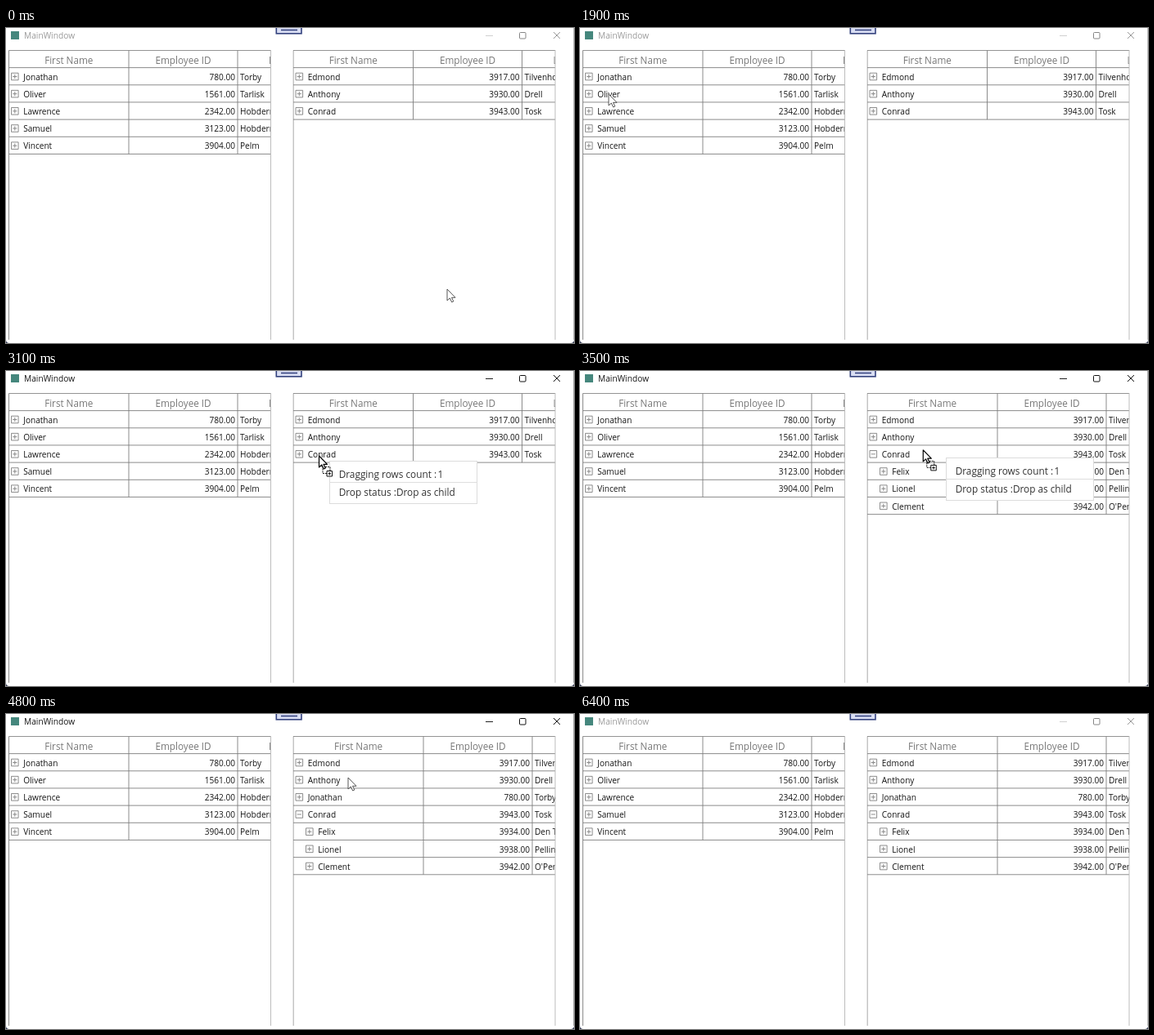
Write an HTML page that moves like this. It is 694 px wide and 386 px high and loops after 7000 ms.

```html
<!DOCTYPE html>
<html lang="en">
<head>
<meta charset="utf-8">
<title>MainWindow</title>
<style>
  html, body { margin: 0; width: 100%; height: 100%; overflow: hidden; background: #2c3450; }
  svg { display: block; width: 694px; height: 386px; font-family: "Open Sans", "Noto Sans", sans-serif; font-size: 10.1px; fill: #161616; }
  .line { stroke: #7d7d7d; stroke-width: .88; fill: none; }
  .pale { stroke: #b4b4b4; stroke-width: .88; fill: none; }
  .head { font-size: 11.7px; fill: #787878; text-anchor: middle; }
  .num { text-anchor: end; }
  .popup { font-size: 11.8px; fill: #333; }
</style>
</head>
<body>
<svg id="stage" viewBox="0 0 694 386">
  <defs>
    <clipPath id="leftClip"><rect x="3" y="27" width="320.500" height="355"/></clipPath>
    <clipPath id="rightClip"><rect x="350.500" y="27" width="320.500" height="355"/></clipPath>
  </defs>
  <rect y="-10" width="694" height="396" rx="4" fill="#fff"/>
  <path id="edge" d="M693.5 0V382"/>
  <rect x="6" y="4" width="10" height="10" fill="#45877d"/>
  <text id="title" x="22" y="13.3" font-size="10.2">MainWindow</text>
  <g fill="none">
    <path id="minimize" d="M586 9.5h9"/>
    <rect id="maximize" x="627.5" y="5.5" width="7.5" height="7.5" rx="1"/>
    <path id="close" d="M669 5l8 8m0-8l-8 8"/>
  </g>
  <rect x="330.3" y="-4" width="30.7" height="10.8" fill="#d9def3" stroke="#34427e" stroke-width="1.6"/>
  <path d="M336 2.5h20" stroke="#34427e" stroke-width="1.6"/>
  <g id="left" clip-path="url(#leftClip)"></g>
  <g id="right" clip-path="url(#rightClip)"></g>
  <path class="pale" d="M323.5 27V382M671 27V382"/>
  <g id="arrows" fill="#fff" stroke="#8a8a8a">
    <path d="M365 72.5h4.5v7.5h3L367.2 87l-5.2-7h3z"/>
    <path d="M365 110h4.5v-7.5h3L367.2 95.5l-5.2 7h3z"/>
  </g>
  <g id="popup" class="popup">
    <rect width="180" height="52" fill="#fff" stroke="#dcdcdc"/>
    <path d="M0 26H180" stroke="#dedede"/>
    <text x="11.2" y="20.3">Dragging rows count :<tspan dx="1.5">1</tspan></text>
    <text x="11.2" y="42.7">Drop status :<tspan id="status"></tspan></text>
  </g>
  <g id="cursor">
    <g id="badge" fill="none" stroke="#111">
      <rect x="4.5" y="13.5" width="9" height="8" stroke-dasharray="2 1"/>
      <path id="plus" fill="#fff" d="M9.5 18.5h6.500v6.500h-6.500zM12.750 20v3.500M11 21.750h3.500"/>
    </g>
    <path id="pointer" fill="#fff" stroke-linejoin="round" d="M0 0V14L3.3 11 5.7 16 7.8 15 5.5 10.3H10Z"/>
  </g>
</svg>
<script>
const LOOP = 7000, STEP = 100;
const ACTIVATE = 2500, EXPAND = 3200, DROP = 4400, DEACTIVATE = 6400;
const HEADER_TOP = 27.43, ROW_HEIGHT = 21.17;
const $ = id => document.getElementById(id);

const person = (first, id, last, depth = 0) => ({ first, id, last, depth });
const dragged = person("Jonathan", 780, "Torby");
const leftRows = [
  dragged,
  person("Oliver", 1561, "Tarlisk"),
  person("Lawrence", 2342, "Hobdern"),
  person("Samuel", 3123, "Hobdern"),
  person("Vincent", 3904, "Pelm")
];
const parent = person("Conrad", 3943, "Tosk");
const roots = [person("Edmond", 3917, "Tilvenhoer"), person("Anthony", 3930, "Drell")];
const children = [
  person("Felix", 3934, "Den Torel", 1),
  person("Lionel", 3938, "Pellinger", 1),
  person("Clement", 3942, "O'Pendry", 1)
];

// Time, x and y of the pointer tip
const path = [
  [0, 539, 320], [100, 30, 58], [200, 539, 320], [1100, 539, 320],
  [1900, 35, 81], [2000, 33, 73], [2300, 49, 56], [2400, 49, 56],
  [2600, 97, 75], [2700, 127, 82], [2900, 320, 98], [3000, 381, 104],
  [3200, 384, 104], [3400, 433, 100], [3700, 380, 88], [4300, 380, 88],
  [4800, 418, 78], [5100, 130, 57], [5200, 60, 51], [5300, 35, 60],
  [5500, 90, 135], [5700, 240, 235], [5900, 402, 259], [6100, 654, 174], [LOOP, 654, 174]
];

function pointerAt(time) {
  const i = path.findIndex(key => key[0] > time);
  const [t0, x0, y0] = path[i - 1], [t1, x1, y1] = path[i];
  let p = (time - t0) / (t1 - t0);
  p = p * p * (3 - 2 * p);
  return [x0 + (x1 - x0) * p, y0 + (y1 - y0) * p];
}

const line = d => `<path class="line" d="${d}"/>`;
const text = (x, y, value, kind = "") => `<text class="${kind}" x="${x}" y="${y}">${value}</text>`;
const rowTop = i => HEADER_TOP + ROW_HEIGHT * (i + 1);

function gridMarkup(x, firstWidth, rows, openRow) {
  const idCol = x + firstWidth, lastCol = idCol + 133, bottom = rowTop(rows.length);
  let out = line(`M${x} 382V${HEADER_TOP}h330M${x} ${rowTop(0)}h330M${idCol} ${HEADER_TOP}V${bottom}M${lastCol} ${HEADER_TOP}V${bottom}`);
  out += text((x + idCol) / 2, 43.5, "First Name", "head")
    + text(idCol + 66.5, 43.5, "Employee ID", "head")
    + text(lastCol + 67, 43.5, "Last Name", "head");
  rows.forEach((row, i) => {
    const top = rowTop(i), base = top + 15.2, indent = x + row.depth * 12.5;
    const upright = row === openRow ? "" : "m-2.6-2.6v5.2";
    out += line(`M${x} ${rowTop(i + 1)}h330M${indent + 3} ${top + 6.6}h8.6v8.6h-8.6z`)
      + line(`M${indent + 4.7} ${top + 10.9}h5.2${upright}`)
      + text(indent + 17.7, base, row.first)
      + text(lastCol - 3, base, row.id.toFixed(2), "num")
      + text(lastCol + 3, base, row.last);
  });
  return out;
}

const rightStates = [
  gridMarkup(351, 146.5, [...roots, parent]),
  gridMarkup(351, 159, [...roots, parent, ...children], parent),
  gridMarkup(351, 159, [...roots, dragged, parent, ...children], parent)
];
$("left").innerHTML = gridMarkup(3.5, 146.5, leftRows);

const show = (id, visible) => $(id).setAttribute("visibility", visible ? "visible" : "hidden");
const place = (id, x, y) => $(id).setAttribute("transform", `translate(${x} ${y})`);
const stroke = (id, color) => $(id).setAttribute("stroke", color);
let shownState = -1;

function render(time) {
  const t = Math.floor(time / STEP) * STEP;
  const active = t >= ACTIVATE && t < DEACTIVATE;
  const dragging = t >= ACTIVATE && t < DROP;
  const state = (t >= EXPAND) + (t >= DROP);
  if (state !== shownState) {
    $("right").innerHTML = rightStates[state];
    shownState = state;
  }

  stroke("edge", active ? "#b0b0b0" : "#c4c4c4");
  $("title").setAttribute("fill", active ? "#161616" : "#9a9a9a");
  stroke("minimize", active ? "#222" : "#d0d0d0");
  stroke("maximize", active ? "#111" : "#858585");
  stroke("close", active ? "#111" : "#9a9a9a");

  const [x, y] = pointerAt(t);
  place("cursor", x, y);
  show("cursor", t < DEACTIVATE);
  stroke("pointer", dragging ? "#000" : "#444");
  $("pointer").setAttribute("stroke-width", dragging ? 1.2 : 0.9);

  // The popup trails the pointer by one step
  const [px, py] = pointerAt(Math.max(0, t - STEP));
  const below = dragging && t >= 3600, allowed = t >= 3000;
  place("popup", Math.round(px) + 14.5, Math.round(py) + 6.5);
  $("status").textContent = below ? "Drop below" : allowed ? "Drop as child" : "Cannot drop here";
  show("popup", dragging);
  show("arrows", below);
  // Parts inside the cursor group are hidden through display so the group keeps control
  $("badge").style.display = dragging ? "" : "none";
  $("plus").style.display = allowed ? "" : "none";
}

const start = performance.now();
function tick(now) {
  render(Math.max(0, now - start) % LOOP);
  requestAnimationFrame(tick);
}
render(0);
requestAnimationFrame(tick);
</script>
</body>
</html>
```
